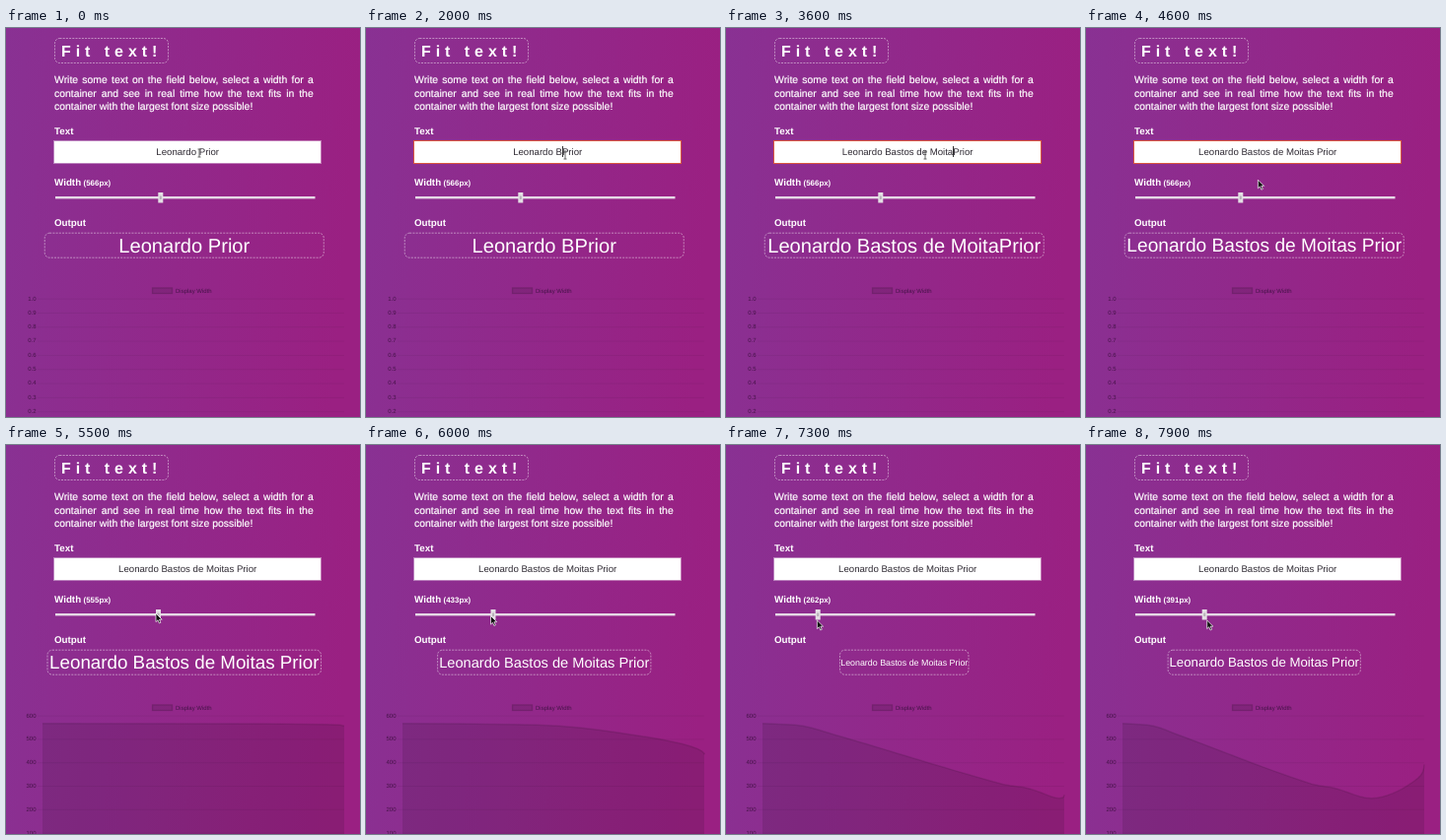
An HTML page with a canvas that plays this animation: 359 px wide and 395 px high, repeating every 8 s.

```html
<!DOCTYPE html>
<html lang="en">
<head>
<meta charset="utf-8">
<title>Fit text!</title>
<style>
  html, body { margin: 0; width: 100%; height: 100%; overflow: hidden; background: #922a8a; }
  canvas, svg { position: absolute; left: 0; top: 0; width: 359px; height: 395px; }
  text { font-family: "Liberation Sans", Arial, sans-serif; white-space: pre; text-rendering: geometricPrecision; }
</style>
</head>
<body>
<canvas id="stage" width="359" height="395"></canvas>
<svg id="layer" viewBox="0 0 359 395"></svg>
<script>
const LOOP = 8000, STEP = 100, DRAG = 5300;
const FONT = '"Liberation Sans", Arial, sans-serif';
const FIRST = 'Leonardo ', MIDDLE = 'Bastos de Moitas ', LAST = 'Prior';
const TYPING = 2000, PAUSES = [2200, 3000, 3400], DOUBLE = 2600;
// a few [ms since the drag began, slider width] pairs
const WIDTHS = [[0, 566], [200, 555], [350, 520], [1200, 315], [1450, 291], [1850, 247], [2400, 338], [2600, 391]];

const g = document.getElementById('stage').getContext('2d');
const layer = document.getElementById('layer');

const ramp = (t, a, b) => Math.min(1, Math.max(0, (t - a) / (b - a)));

// smooth curve through the width keys
function widthAt(age) {
  const end = WIDTHS.length - 1;
  const slope = i => {
    const [a, u] = WIDTHS[Math.max(0, i - 1)], [b, v] = WIDTHS[Math.min(end, i + 1)];
    return (v - u) / (b - a);
  };
  let i = 0;
  while (i < end - 1 && age > WIDTHS[i + 1][0]) i++;
  const [a, u] = WIDTHS[i], [b, v] = WIDTHS[i + 1];
  const s = ramp(age, a, b), r = 1 - s;
  return u * r * r * (1 + 2 * s) + v * s * s * (3 - 2 * s)
    + (b - a) * s * r * (slope(i) * r - slope(i + 1) * s);
}

function typedCount(t) {
  if (t < TYPING) return 0;
  const keys = (t - TYPING) / STEP + 1 - PAUSES.filter(p => p <= t).length;
  return Math.min(MIDDLE.length, keys + (t >= DOUBLE ? 1 : 0));
}

function el(tag, attrs) {
  const node = document.createElementNS('http://www.w3.org/2000/svg', tag);
  for (const k in attrs) node.setAttribute(k, attrs[k]);
  return layer.appendChild(node);
}

function label(str, x, y, size, attrs) {
  const node = el('text', { x, y, 'font-size': size, fill: '#fff', ...attrs });
  node.textContent = str;
  return node;
}

function measure(str, size) {
  g.font = '100px ' + FONT;
  return g.measureText(str).width * size / 100;
}

const bold = { 'font-weight': 'bold' };
const mid = { 'text-anchor': 'middle' };
const dim = { fill: '#451348' };

label('Fit text!', 56, 28.7, 16, { ...bold, 'letter-spacing': 4.95 });
['Write some text on the field below, select a width for a',
 'container and see in real time how the text fits in the',
 'container with the largest font size possible!'].forEach((line, i) => {
  const spare = 263 - measure(line, 10.42);
  const gap = i < 2 ? spare / (line.split(' ').length - 1) : 0;
  label(line, 49, 56 + i * 13.5, 10.42, { 'word-spacing': gap, stroke: '#fff', 'stroke-width': 0.2 });
});
label('Text', 49, 108.2, 9.8, bold);
label('Width', 49, 159.8, 9.8, bold);
label('Output', 49, 201.2, 9.8, bold);
label('Display Width', 172, 268.8, 6, dim);
const size = label('', 78.6, 159.8, 7.9, bold);
const field = label('', 184.2, 129.2, 9.63, { ...mid, fill: '#2f2a33' });
const output = label('', 180.75, 228, 20, mid);
const ticks = Array.from({ length: 9 }, () => label('', 30.5, 0, 6, { ...dim, 'text-anchor': 'end' }));
const caret = el('rect', { y: 120, width: 1, height: 11, fill: '#333' });
const beam = el('path', { d: 'M-1.5-4H1.5M0-4V4M-1.5 4H1.5', stroke: '#555', 'stroke-width': 0.9, fill: 'none' });
const arrow = el('path', {
  d: 'M0 0V8.6L2 6.8L3.4 10L4.9 9.3L3.5 6.2H6.2Z',
  fill: '#111', stroke: '#fff', 'stroke-width': 0.7
});

function dashed(x, y, w, h) {
  g.strokeStyle = 'rgba(255,255,255,.45)';
  g.lineWidth = 1;
  g.setLineDash([2, 1.2]);
  g.beginPath();
  g.roundRect(x + 0.5, y + 0.5, w - 1, h - 1, 5);
  g.stroke();
  g.setLineDash([]);
}

// chart points slide towards their slots, always a little late
function points(age) {
  const list = [], dt = 20, ease = 1 - Math.exp(-dt / 280);
  let due = 0;
  for (let t = 0; t <= age; t += dt) {
    while (due <= t) {
      list.push({ x: list.length ? 1 : 0, v: widthAt(due) });
      due += due < 1200 ? 40 : 56;
    }
    const last = Math.max(1, list.length - 1);
    list.forEach((p, i) => { p.x += (i / last - p.x) * ease; });
  }
  list.push({ x: 1, v: widthAt(age) });
  return list;
}

function drawChart(t) {
  const filled = t >= DRAG;
  const gap = filled ? 23.8 : 14.33;
  ticks.forEach((node, i) => {
    const y = 274.6 + i * gap;
    node.textContent = filled ? (i < 6 ? 600 - i * 100 : '') : (1 - i / 10).toFixed(1);
    node.setAttribute('y', y + 1.9);
    g.fillStyle = 'rgba(0,0,0,.06)';
    g.fillRect(32, y, 311, 1);
  });
  g.fillStyle = g.strokeStyle = 'rgba(0,0,0,.11)';
  g.lineWidth = 1.5;
  g.fillRect(148, 263.5, 21, 6.5);
  g.strokeRect(148.5, 264, 20, 5.5);
  if (!filled) return;
  const path = new Path2D();
  points(t - DRAG).forEach(p => path.lineTo(37 + 306 * p.x, 274.6 + (600 - p.v) * 0.238));
  g.stroke(path);
  path.lineTo(343, 400);
  path.lineTo(37, 400);
  g.fill(path);
}

function drawField(focus) {
  g.fillStyle = '#fff';
  g.fillRect(49, 115, 270, 22);
  g.lineWidth = 1;
  g.strokeStyle = 'rgba(255,255,255,.4)';
  g.strokeRect(48.5, 114.5, 271, 23);
  g.globalAlpha = focus;
  g.strokeStyle = '#d9573f';
  g.strokeRect(48.5, 114.5, 271, 23);
  g.globalAlpha = 1;
}

function drawSlider(x) {
  g.fillStyle = '#e6d9e6';
  g.fillRect(50, 171, 263.5, 2.4);
  g.fillStyle = '#e4dfe4';
  g.fillRect(x - 2.5, 167, 5, 10.5);
  g.fillStyle = '#b9b1b9';
  g.fillRect(x - 1, 170.5, 2, 3.5);
}

function draw(t) {
  const width = Math.round(widthAt(t - DRAG));
  const before = FIRST + MIDDLE.slice(0, typedCount(t));
  const name = before + LAST;
  const thumb = 104.3 + (width - 315) * 0.2092;

  const bg = g.createLinearGradient(0, 10, 359, 40);
  bg.addColorStop(0, '#893193');
  bg.addColorStop(1, '#9a2082');
  g.fillStyle = bg;
  g.fillRect(0, 0, 359, 395);

  dashed(49, 10, 116, 26);
  drawField(ramp(t, 400, 700) - ramp(t, 5200, 5500));
  drawSlider(thumb);
  const box = width * 0.5018;
  dashed(180.75 - box / 2, 207.7, box, 26);
  drawChart(t);

  const fit = Math.min(20.1, box * 0.982 / measure(name, 1));
  output.textContent = field.textContent = name;
  output.setAttribute('font-size', fit);
  output.setAttribute('y', 220.6 + fit * 0.3465);
  size.textContent = `(${width}px)`;

  const blink = (t >= 500 && t < 1000) || (t >= 1600 && t < 4400) || (t >= 5000 && t < DRAG);
  caret.setAttribute('visibility', blink ? 'visible' : 'hidden');
  caret.setAttribute('x', Math.round(184.2 - measure(name, 9.63) / 2 + measure(before, 9.63)));

  // the pointer runs slightly ahead of the thumb while dragging
  const lead = 2.5 * ramp(t, DRAG, 5500) * (2 * ramp(t, 7000, 7900) - 1);
  const mx = t > DRAG ? thumb + lead
    : 196 + 6 * ramp(t, 500, 700) - 46 * ramp(t, 4300, 4800) + 2 * ramp(t, 4900, 5100);
  const my = 127 + 2 * ramp(t, 500, 700) + 42 * ramp(t, 4300, 4800) + 7 * ramp(t, 5500, 6900);
  const inField = my < 138;
  beam.setAttribute('visibility', inField ? 'visible' : 'hidden');
  arrow.setAttribute('visibility', inField ? 'hidden' : 'visible');
  for (const node of [beam, arrow]) node.setAttribute('transform', `translate(${mx} ${my})`);
}

const start = performance.now();
function tick() {
  const t = (performance.now() - start) % LOOP;
  draw(Math.floor(t / STEP) * STEP);
  requestAnimationFrame(tick);
}
tick();
</script>
</body>
</html>
```
